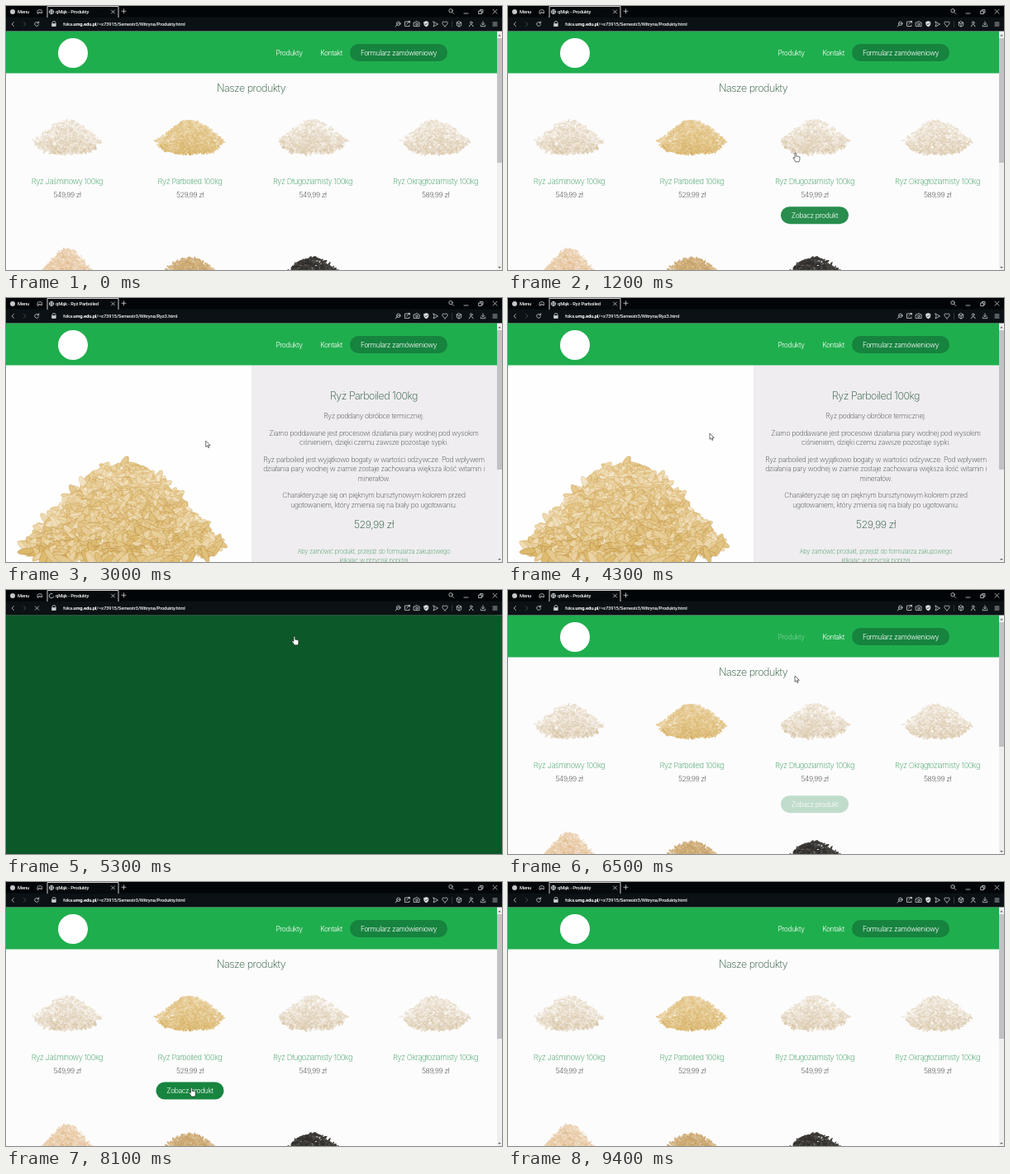
These frames come from a looping animation (600 px wide and 320 px high, 9800 ms). An HTML page with a canvas:

```html
<!DOCTYPE html>
<html lang="pl">
<head>
<meta charset="utf-8">
<title>Produkty</title>
<style>
  html, body { margin: 0; width: 600px; height: 320px; overflow: hidden; background: #fdfcfd; }
  canvas, svg { position: absolute; left: 0; top: 0; width: 600px; height: 320px; }
  .page { font: 200 8.5px Inter, Lato, sans-serif; letter-spacing: -.3px; text-anchor: middle; }
  .head { font-size: 12.5px; letter-spacing: -.5px; fill: #1b4f2e; }
  .name { font-size: 9.4px; letter-spacing: -.46px; fill: #2f9a55; }
  .price { font-size: 8.8px; letter-spacing: -.45px; fill: #2c302d; }
  .nav { fill: #fff; font-weight: 300; letter-spacing: -.4px; }
  .para { fill: #3f4441; }
  .note { font-size: 7.5px; letter-spacing: -.28px; fill: #389455; }
  .bar { font: 500 5.9px Roboto, "Open Sans", sans-serif; letter-spacing: -.2px; fill: #f0f2f3; }
  .host { font-weight: 700; fill: #fff; }
  .icons { fill: none; stroke: #c9ced2; stroke-width: .8; stroke-linecap: round; stroke-linejoin: round; }
</style>
</head>
<body>
<canvas id="listRice" class="list" width="600" height="320"></canvas>
<canvas id="detailRice" class="detail" width="600" height="320"></canvas>

<svg viewBox="0 0 600 320">
  <g class="page">
    <g class="list">
      <text class="head" x="296.5" y="104">Nasze produkty</text>
      <g id="cards"></g>
    </g>

    <g class="detail">
      <text class="head" x="445" y="123">Ryż Parboiled 100kg</text>
      <g id="paras" class="para"></g>
      <text class="head" x="445" y="279">529,99 zł</text>
      <g class="note">
        <text x="445" y="309.5">Aby zamówić produkt, przejdź do formularza zakupowego</text>
        <text x="445" y="321">klikając w przycisk poniżej</text>
      </g>
    </g>

    <path fill="#1fae4d" d="M0 30.5h594v51H0z"/>
    <circle cx="81" cy="57" r="18" fill="#fff"/>
    <rect x="416" y="46" width="118" height="21" rx="10.5" fill="#16833f"/>
    <g class="nav">
      <text id="link" x="342.5" y="59.5">Produkty</text>
      <text x="393.5" y="59.5">Kontakt</text>
      <text x="475" y="59.5">Formularz zamówieniowy</text>
    </g>

    <path fill="#efeff0" d="M594 31h6v289h-6z"/>
    <path class="list" fill="#c2c2c4" d="M594 39h6v151h-6z"/>
    <path class="detail" fill="#c2c2c4" d="M594 39h6v169h-6z"/>
    <path fill="#606060" d="M595.2 36.5l1.8-2 1.8 2zM595.2 316l1.8 2 1.8-2z"/>
    <path id="blank" fill="#0d5828" d="M0 30.5h600V320H0z"/>
  </g>

  <g class="bar">
    <path fill="#020507" d="M0 0h600v14H0z"/>
    <path fill="#0b1114" d="M0 13.5h600v17H0z"/>
    <path fill="#060a0c" stroke="#e4e7e9" stroke-width=".9" d="M50 14V.5h86V14"/>
    <circle cx="8" cy="7" r="3" fill="#c4c8cb"/>
    <text x="14" y="9.3">Menu</text>
    <g class="list">
      <text x="60" y="9.2">qMąk - Produkty</text>
      <text x="69" y="24.2">foka.<tspan class="host">umg.edu.pl</tspan>/~s73915/Semestr3/Witryna/Produkty.html</text>
    </g>
    <g class="detail">
      <text x="60" y="9.2">qMąk - Ryż Parboiled</text>
      <text x="69" y="24.2">foka.<tspan class="host">umg.edu.pl</tspan>/~s73915/Semestr3/Witryna/Ryz3.html</text>
    </g>
    <g class="icons">
      <path d="M38 8.7V6.5q0-1.7 1.6-1.7h2.3q1.6 0 1.6 1.7v2.2h-1.7V7.5h-2v1.2z"/>
      <path d="M127.5 5l4 4m0-4l-4 4M140 6.3h5m-2.5-2.5v5"/>
      <circle cx="538" cy="5.7" r="2.2"/>
      <path d="M539.7 7.4l2 2M554 9h5M572 6h3.5v3.5H572zM573.5 6V4.5h3.5V8h-1.5M589 4.2l5 5m0-5l-5 5"/>
      <path d="M9.5 19.5L7 22l2.5 2.5"/>
      <path stroke="#4d5459" d="M21.5 19.5L24 22l-2.5 2.5"/>
      <path d="M56 21.3v-1q0-1.8 2-1.8t2 1.8v1"/>
      <path fill="#c9ced2" d="M55.8 21.5h4.4v3h-4.4z"/>
      <circle cx="474.7" cy="21.3" r="2.3"/>
      <path d="M473 23l-2 2m2.6-3.7h2.2M487 19h-4.5v5.5h5.5V23m-3.5-.7l4-3.8m-2 0h2v2"/>
      <path d="M493.5 20h1.5l.8-1.2h2l.8 1.2h1.5v4.5h-6.6z"/>
      <circle cx="496.8" cy="22.1" r="1.2"/>
      <path fill="#e4e6e8" d="M505.7 19.5l2.6-.9 2.6.9v2.2q0 2.3-2.6 3.2-2.6-.9-2.6-3.2z"/>
      <path stroke="#0d1317" d="M507 21.7l1 1 1.6-1.8"/>
      <path d="M517 19l5.5 3-5.5 3 1-3z"/>
      <path d="M531 24.8q-3.2-2.4-3.2-4.2 0-1.6 1.6-1.6 1.1 0 1.6 1 .5-1 1.6-1 1.6 0 1.6 1.6 0 1.8-3.2 4.2z"/>
      <path stroke="#3a4146" d="M539.5 18.5v7"/>
      <path d="M548 18.7l2.7 1.4v3.5L548 25l-2.7-1.4v-3.5zm-2.7 1.4l2.7 1.4 2.7-1.4M548 21.5V25"/>
      <circle cx="562.7" cy="20.2" r="1.3"/>
      <path d="M560.3 24.8q.2-2.2 2.4-2.2t2.4 2.2M577 18.8v4m-1.7-1.7l1.7 1.7 1.7-1.7M574.3 23v1.7h5.4V23M589 20h5m-5 2h5m-5 2h5"/>
      <g id="ready">
        <circle cx="55" cy="7" r="2.7"/>
        <path d="M52.3 7h5.4M55 4.3q-2.2 2.7 0 5.4 2.2-2.7 0-5.4"/>
        <path d="M39.4 20.6a2.5 2.5 0 1 0 .2 2M39.7 18.8v2h-2"/>
      </g>
      <g id="busy">
        <path id="spin" d="M55 4.2a2.8 2.8 0 1 1-2.8 2.8"/>
        <path d="M35.3 19.8l4.4 4.4m0-4.4l-4.4 4.4"/>
      </g>
    </g>
  </g>

  <g id="cursor" fill="#fff" stroke="#111" stroke-width=".6" stroke-linejoin="round">
    <path id="arrow" d="M0 0v7.3l1.7-1.5 1.2 2.7 1.2-.6L3 5.3h2.3z"/>
    <path id="hand" d="M-1 1q0-1 .9-1t.9 1v3.2q1.1-.7 1.5.2 1.1-.5 1.4.3 1.2-.3 1.2.9V8q0 1.3-1 2.8H-.2Q-1 9-2.9 6.7q-.6-1 .3-1.2.8 0 1.6 1z"/>
  </g>
</svg>

<script>
const LOOP = 9800, TICK = 100, FADE = 600;
const $ = id => document.getElementById(id);
const column = i => 74 + 148.5 * i;

// Text blocks
const products = [
  ['Jaśminowy', 549], ['Parboiled', 529], ['Długoziarnisty', 549], ['Okrągłoziarnisty', 589]
];
$('cards').innerHTML = products.map(([kind, price], i) => {
  const x = column(i);
  return `<text class="name" x="${x}" y="216">Ryż ${kind} 100kg</text>
    <text class="price" x="${x}" y="232">${price},99 zł</text>
    <g id="buy${i}" opacity="0"><rect x="${x - 41}" y="242.5" width="82" height="21" rx="10.5" fill="#17853f"/>
    <text class="nav" x="${x}" y="256">Zobacz produkt</text></g>`;
}).join('');

const paras = [
  ['Ryż poddany obróbce termicznej.'],
  ['Ziarno poddawane jest procesowi działania pary wodnej pod wysokim',
    'ciśnieniem, dzięki czemu zawsze pozostaje sypki.'],
  ['Ryż parboiled jest wyjątkowo bogaty w wartości odżywcze. Pod wpływem',
    'działania pary wodnej w ziarnie zostaje zachowana większa ilość witamin i', 'minerałów.'],
  ['Charakteryzuje się on pięknym bursztynowym kolorem przed',
    'ugotowaniem, który zmienia się na biały po ugotowaniu.']
];
let line = 146;
for (const para of paras) {
  for (const words of para) {
    $('paras').innerHTML += `<text x="445" y="${line}">${words}</text>`;
    line += 11.5;
  }
  line += 9;
}

// Rice piles: random grains under a cosine hill, lighter towards the top
function seeded(s) {
  return () => (s = (s * 16807) % 2147483647) / 2147483647;
}
function pile(ctx, { x, half, top, foot, bottom, len, wide, count, tone: [hue, sat, light], seed }) {
  const rnd = seeded(seed), grains = [];
  for (let i = 0; i < count; i++) {
    const u = (rnd() + rnd() * .6 - .8) / .8;
    const hi = foot - (foot - top) * Math.cos(u * Math.PI / 2) ** 1.3;
    const lo = bottom - (bottom - foot) * u ** 4;
    const depth = rnd();
    grains.push({ x: x + u * half, y: hi + (lo - hi) * depth, turn: (rnd() - .5) * 2.6,
      size: .75 + rnd() * .4, light: light + 5 - 9 * depth + 16 * (rnd() - .5) });
  }
  grains.sort((a, b) => a.y - b.y);
  ctx.lineWidth = len / 35;
  for (const g of grains) {
    ctx.beginPath();
    ctx.ellipse(g.x, g.y, len * g.size / 2, wide * g.size / 2, g.turn, 0, 7);
    ctx.fillStyle = `hsl(${hue} ${sat}% ${g.light}%)`;
    ctx.strokeStyle = `hsl(${hue - 4} ${sat}% ${g.light - 28}% / .5)`;
    ctx.fill();
    ctx.stroke();
  }
}
const tones = {
  white: [38, 38, 89], gold: [41, 62, 75], cream: [34, 58, 82], brown: [37, 50, 65], black: [30, 5, 22]
};
const small = { half: 42, top: 139, foot: 163, bottom: 179, len: 6, wide: 2, count: 850 };

const list = $('listRice').getContext('2d');
list.fillStyle = '#fdfcfd';
list.fillRect(0, 0, 600, 320);
['white', 'gold', 'white', 'white', 'cream', 'brown', 'black'].forEach((tone, i) => {
  const below = i < 4 ? 0 : tone === 'cream' ? 156 : 166;
  pile(list, { ...small, x: column(i % 4), half: tone === 'cream' ? 30 : small.half,
    top: small.top + below, foot: small.foot + below, bottom: small.bottom + below,
    tone: tones[tone], seed: 11 + 12 * i });
});

const detail = $('detailRice').getContext('2d');
detail.fillStyle = '#fefefe';
detail.fillRect(0, 0, 600, 320);
pile(detail, { x: 142, half: 126, top: 202, foot: 303, bottom: 319, len: 23, wide: 7.5, count: 950,
  tone: tones.gold, seed: 97 });
detail.fillStyle = '#efedf0';
detail.fillRect(297, 81.5, 303, 239);

// Motion
const ease = s => (s = Math.min(1, Math.max(0, s)), s * s * (3 - 2 * s));
const hover = (t, from, to) => ease((t - from) / FADE) - ease((t - to) / FADE);
const show = (el, on) => { el.style.visibility = on ? 'visible' : 'hidden'; };
const pages = name => document.querySelectorAll('.' + name);

// Pointer stops: [ms, x, y]
const stops = [
  [600, 400, 315], [1300, 345, 170], [1700, 266, 153], [2300, 222, 252], [2600, 222, 252],
  [3100, 244, 164], [4300, 244, 164], [5000, 349, 56], [6200, 349, 56], [6500, 347, 104],
  [6800, 345, 190], [7300, 238, 230], [8200, 224, 250], [8900, 250, 322]
];
function pointer(t) {
  const i = Math.max(1, stops.findIndex(s => s[0] > t));
  const [t0, x0, y0] = stops[i - 1], [t1, x1, y1] = stops[i];
  const k = ease((t - t0) / (t1 - t0));
  return [x0 + (x1 - x0) * k, y0 + (y1 - y0) * k];
}

function lift(el, v) {
  el.setAttribute('opacity', v);
  el.setAttribute('transform', `translate(0 ${9 * (1 - v)})`);
}

function draw(t) {
  const within = (a, b) => t >= a && t < b;
  const onDetail = within(2600, 5300);
  const loading = within(2400, 3000) || within(5100, 6100);
  pages('list').forEach(el => show(el, !onDetail));
  pages('detail').forEach(el => show(el, onDetail));
  show($('blank'), within(2600, 2800) || within(5300, 5600));
  show($('busy'), loading);
  show($('ready'), !loading);
  $('spin').setAttribute('transform', `rotate(${t * .36} 55 7)`);

  lift($('buy1'), t < 5300 ? hover(t, 1600, 5300) : hover(t, 6850, 8600));
  lift($('buy2'), t < 5300 ? hover(t, 700, 1300) : hover(t, 6300, 6900));
  $('link').setAttribute('opacity', 1 - .7 * (t < 5300 ? hover(t, 4900, 5300) : hover(t, 5600, 6350)));

  const hand = within(1000, 2700) || within(5000, 6300) || within(6700, 8600);
  const moving = within(600, 8900);
  if (moving) $('cursor').setAttribute('transform', `translate(${pointer(t)})`);
  show($('hand'), moving && hand);
  show($('arrow'), moving && !hand);
}

const start = performance.now();
function frame() {
  const t = (performance.now() - start) % LOOP;
  draw(Math.floor(t / TICK) * TICK);
  requestAnimationFrame(frame);
}
frame();
</script>
</body>
</html>
```
